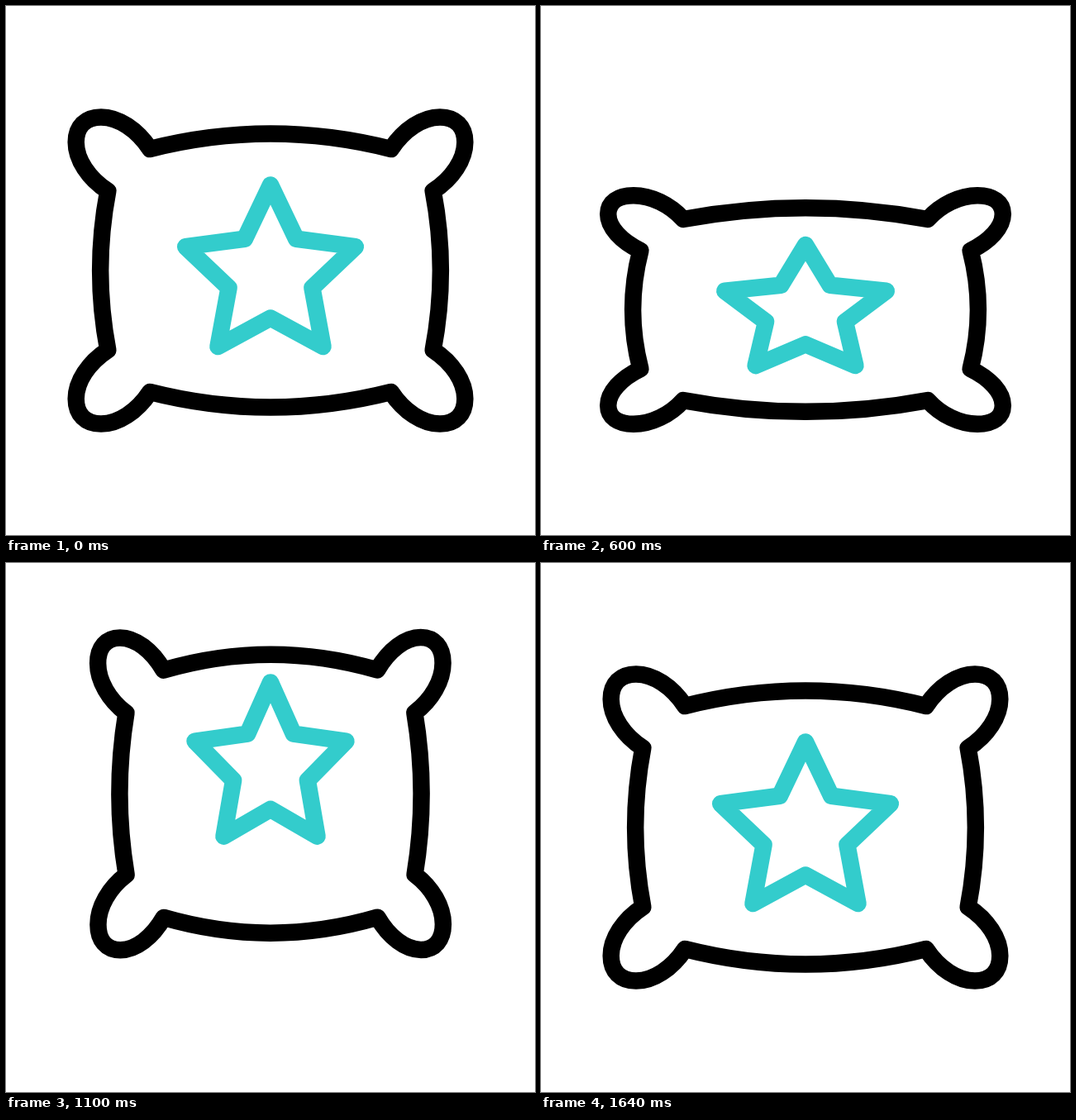
Write an HTML page with a canvas that moves like this. It is 640 px wide and 640 px high and loops after 2100 ms.

```html
<!DOCTYPE html>
<html lang="en">
<head>
<meta charset="utf-8">
<title>Bouncing pillow</title>
<style>
  html, body { margin: 0; width: 100%; height: 100%; overflow: hidden; background: #fff; }
  canvas { display: block; width: 100vmin; height: 100vmin; margin: auto; }
</style>
</head>
<body>
<canvas id="stage" width="640" height="640"></canvas>
<script>
const ctx = document.getElementById('stage').getContext('2d');
const SIZE = 640;
const LOOP = 2100;
const LINE = 20.5;

// Four lobes joined by bulging edges; each lobe is symmetric about its diagonal.
function pillowShape() {
  const halfWidth = 235.3, halfHeight = 185.6;
  const halfLobe = [[38.6, 89.5], [15, 74], [0, 51.2], [0, 30.3], [0, 11.4]];
  const lobe = [...halfLobe, ...halfLobe.map(([x, y]) => [y, x]).reverse()];
  const path = new Path2D();
  for (let corner = 0; corner < 4; corner++) {
    const right = corner === 1 || corner === 2;
    const below = corner >= 2;
    const points = lobe.map(([x, y]) => [
      (x - halfWidth) * (right ? -1 : 1),
      (y - halfHeight) * (below ? -1 : 1)
    ]);
    if (right !== below) points.reverse();
    path.lineTo(...points[0]);
    for (let k = 1; k < points.length; k += 3) {
      path.bezierCurveTo(...points[k], ...points[k + 1], ...points[k + 2]);
    }
    const next = (right ? [halfWidth, -halfHeight] : [-halfWidth, halfHeight]);
    const [endX, endY] = points[points.length - 1];
    const horizontal = corner % 2 === 0;
    path.quadraticCurveTo(
      horizontal ? 0 : Math.sign(next[0]) * 215,
      horizontal ? Math.sign(endY) * 184 : 0,
      horizontal ? -endX : endX,
      horizontal ? endY : -endY
    );
  }
  path.closePath();
  return path;
}

function starShape(outer, inner) {
  const path = new Path2D();
  for (let i = 0; i < 10; i++) {
    const angle = i * Math.PI / 5;
    const radius = i % 2 ? inner : outer;
    path.lineTo(radius * Math.sin(angle), -radius * Math.cos(angle));
  }
  path.closePath();
  return path;
}

// Each track lists its values at rest, squashed, at the top of the leap and landed.
// The landed pose is held for `hold` ms on either side of the landing.
const parts = [
  {
    shape: pillowShape(), color: '#000', hold: 0,
    y: [320, 368.3, 252.6, 370.7],
    width: [1, 1.015, 0.86, 0.98],
    height: [1, 0.741, 1.098, 0.742],
    tilt: [0, 0, 0, -0.26]
  },
  {
    shape: starShape(108.1, 53), color: '#33cccc', hold: 20,
    y: [324.6, 370.5, 206.7, 369.5],
    width: [1, 0.95, 0.858, 0.985],
    height: [1, 0.743, 1.016, 0.76],
    tilt: [0, 0, 0, 0]
  }
];

const SQUASH = 650, LEAP = 995, LAND = 1340, SETTLE = 1640;

const ramp = (time, start, end) => {
  const p = Math.min(1, Math.max(0, (time - start) / (end - start)));
  return p * p * (3 - 2 * p);
};

function follow([rest, squash, leap, land], time, hold) {
  return rest
    + (squash - rest) * ramp(time, 0, SQUASH)
    + (leap - squash) * ramp(time, SQUASH, LEAP)
    + (land - leap) * ramp(time, LEAP, LAND - hold)
    + (rest - land) * ramp(time, LAND + hold, SETTLE);
}

function draw(time) {
  ctx.fillStyle = '#fff';
  ctx.fillRect(0, 0, SIZE, SIZE);
  ctx.lineWidth = LINE;
  ctx.lineJoin = 'round';
  for (const part of parts) {
    const value = track => follow(part[track], time, part.hold);
    const pose = new DOMMatrix()
      .translate(SIZE / 2, value('y'))
      .rotate(value('tilt'))
      .scale(value('width'), value('height'));
    // Transform the outline only, so the line keeps its weight.
    const outline = new Path2D();
    outline.addPath(part.shape, pose);
    ctx.strokeStyle = part.color;
    ctx.stroke(outline);
  }
}

function tick() {
  draw(performance.now() % LOOP);
  requestAnimationFrame(tick);
}
tick();
</script>
</body>
</html>
```
